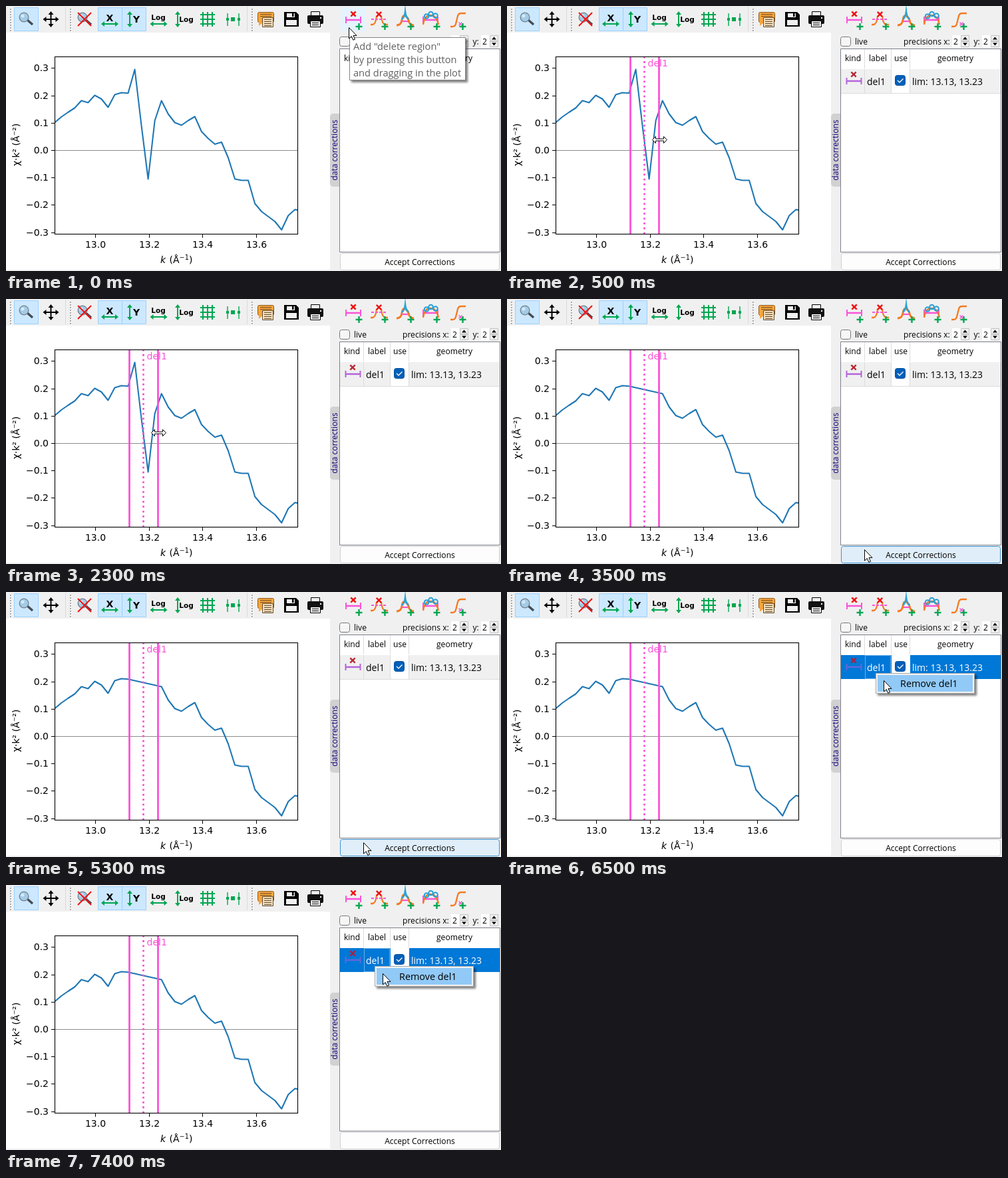
Recreate the animation shown at these times as an HTML page with a canvas. Size 744 px wide and 399 px high, loop 8000 ms.

```html
<!DOCTYPE html>
<html lang="en">
<head>
<meta charset="utf-8">
<title>Data corrections</title>
<style>
html, body { margin: 0; width: 100%; height: 100%; overflow: hidden; background: #f0f0f0; }
canvas { display: block; }
</style>
</head>
<body>
<canvas id="stage" width="744" height="399"></canvas>
<script>
const c = document.getElementById('stage').getContext('2d');
const LOOP = 8000, DRAWN = 500, APPLIED = 3500, MENU = 6500;
const GREEN = '#00a650', PINK = '#fb53d8', ORANGE = '#f47a20', RED = '#f01010', BLUE = '#1f77b4';
const UI = '"Open Sans", sans-serif', PLOT = '"DejaVu Sans", sans-serif';
const small = '12.1px ' + UI, row = '14px ' + UI, plotFont = '14px ' + PLOT;

// Curve heights in pixels, sampled at a constant step in k
const curveY = [175, 166.5, 159.5, 153, 142, 145, 134, 139.5, 152, 133, 130, 130.7, 95, 180,
  260, 172, 142, 162, 175, 179, 172, 166, 188.5, 199, 207.5, 204.5, 228, 260, 262, 262,
  297, 309, 316.5, 324, 336.5, 315, 306, 308];

function text(s, x, y, font = small, color = '#000', align = 'left') {
  c.font = font;
  c.fillStyle = color;
  c.textAlign = align;
  c.fillText(s, x, y);
  return x + c.measureText(s).width;
}

function rect(x, y, w, h, color) {
  c.fillStyle = color;
  c.fillRect(x, y, w, h);
}

function box(x, y, w, h, fill, border, r = 0) {
  c.beginPath();
  c.roundRect(x + .5, y + .5, w - 1, h - 1, r);
  c.fillStyle = fill;
  c.fill();
  c.strokeStyle = border;
  c.lineWidth = 1;
  c.stroke();
}

function line(points, color, width = 1, dash = []) {
  c.beginPath();
  for (let i = 0; i < points.length; i += 2) c.lineTo(points[i], points[i + 1]);
  c.strokeStyle = color;
  c.lineWidth = width;
  c.setLineDash(dash);
  c.stroke();
  c.setLineDash([]);
}

function poly(points, color) {
  c.beginPath();
  for (let i = 0; i < points.length; i += 2) c.lineTo(points[i], points[i + 1]);
  c.fillStyle = color;
  c.fill();
}

function disc(x, y, r, color) {
  c.beginPath();
  c.arc(x, y, r, 0, 7);
  c.fillStyle = color;
  c.fill();
}

function path(d, color, width) {
  c.strokeStyle = color;
  c.lineWidth = width;
  c.stroke(new Path2D(d));
}

function cross(x, y, r, color, width) {
  line([x - r, y - r, x + r, y + r], color, width);
  line([x - r, y + r, x + r, y - r], color, width);
}

function plus(x, y) {
  line([x - 5, y, x + 5, y], GREEN, 2.4);
  line([x, y - 5, x, y + 5], GREEN, 2.4);
}

function span(x, y, color, dash) {
  line([x - 11, y, x + 11, y], color, 2.5, dash);
  for (const end of [x - 11, x + 11]) line([end, y - 5, end, y + 5], color, 2);
}

function doubleArrow(x, y, half, color, vertical, width = 2, head = 4) {
  c.save();
  c.translate(x, y);
  if (vertical) c.rotate(Math.PI / 2);
  line([-half + 2, 0, half - 2, 0], color, width);
  for (const s of [-1, 1]) poly([s * half, 0, s * (half - 5), -head, s * (half - 5), head], color);
  c.restore();
}

function grip(x) {
  for (let y = 4; y < 37; y += 4) {
    rect(x + 1, y + 1, 2, 2, '#fff');
    rect(x, y, 2, 2, '#aaa');
  }
}

function magnifier(x, y) {
  line([x + 5, y + 4, x + 13, y + 11], '#454b55', 3.4);
  disc(x, y, 7.5, '#74818d');
  disc(x, y, 6.2, '#a3cbe6');
  disc(x - 2, y - 2, 2.5, '#d3eaf7');
}

function drawToolbar() {
  rect(0, 0, 744, 399, '#f0f0f0');
  rect(0, 40, 487, 357, '#fff');
  for (const x of [6, 96, 369]) grip(x);
  for (const x of [89, 362]) line([x + .5, 1, x + .5, 38], '#dadada');
  for (const x of [12, 138, 174]) box(x, 2, 37, 36, '#cce8ff', '#99d1ff');

  magnifier(27, 17);
  doubleArrow(67.5, 20, 12, '#000', false, 2, 4);
  doubleArrow(67.5, 20, 12, '#000', true, 2, 4);
  magnifier(115, 17);
  cross(118, 20, 10, RED, 2);

  const bold = 'bold 14px ' + PLOT, log = 'bold 10.5px ' + PLOT;
  text('X', 156, 23, bold, '#000', 'center');
  doubleArrow(156, 27, 13, GREEN);
  doubleArrow(186, 20, 12, GREEN, true);
  text('Y', 196, 25, bold, '#000', 'center');
  text('Log', 229, 21, log, '#000', 'center');
  doubleArrow(229.5, 27, 13, GREEN);
  doubleArrow(258, 20, 12, GREEN, true);
  text('Log', 271, 24, log, '#000', 'center');
  for (const d of [-7, 0, 7]) {
    line([292, 20 + d, 314, 20 + d], GREEN, 2);
    line([303 + d, 9, 303 + d, 31], GREEN, 2);
  }
  for (const x of [333, 350]) {
    line([x, 11, x, 30], GREEN, 1.4);
    rect(x - 2, 18, 4, 4, GREEN);
  }
  rect(338, 17, 6, 6, GREEN);

  box(378, 9, 25, 16, '#f8a53c', '#8a5a1c', 2);
  poly([380, 24, 380, 30, 387, 24], '#f8a53c');
  for (const y of [12, 15]) line([382, y + .5, 399, y + .5], '#6b4a20', 1);
  box(385, 17, 17, 15, '#f5dfbb', '#5d4930');
  for (const y of [20, 23, 26, 29]) line([388, y + .5, 399, y + .5], '#5d4930', 1);

  poly([418, 9, 436, 9, 440, 13, 440, 31, 418, 31], '#000');
  rect(422, 11, 12, 6, '#f0f0f0');
  rect(430, 11, 2.5, 5, '#000');
  rect(421, 21, 16, 8, '#f0f0f0');

  box(458, 8, 14, 9, '#f0f0f0', '#000');
  c.beginPath();
  c.roundRect(453, 14, 24, 13, 2);
  c.fillStyle = '#111';
  c.fill();
  rect(472, 17, 2, 2, '#fff');
  box(457, 22, 16, 10, '#f0f0f0', '#000');
  line([460, 25.5, 470, 25.5], '#000');
  line([460, 28.5, 470, 28.5], '#000');
}

function drawPlot(t) {
  for (let i = 0; i < 4; i++) {
    const x = Math.round(134 + i * 80.7) + .5;
    line([x, 344, x, 349], '#000');
    text((13 + i * .2).toFixed(1), x, 364, plotFont, '#000', 'center');
  }
  for (let i = -3; i <= 3; i++) {
    const y = Math.round(216.9 - i * 41.2) + .5;
    line([68, y, 73, y], '#000');
    text((i / 10).toFixed(1).replace('-', '\u2212'), 64, y + 4.5, plotFont, '#000', 'right');
  }
  let x = text('k', 232, 387, 'italic ' + plotFont) + 1;
  x = text(' (Å', x, 387, plotFont);
  x = text('\u22121', x, 382, '9.7px ' + PLOT);
  text(')', x, 387, plotFont);
  c.save();
  c.translate(20, 209);
  c.rotate(-Math.PI / 2);
  text('χ·k² (Å⁻²)', 0, 0, plotFont, '#000', 'center');
  c.restore();

  c.save();
  c.beginPath();
  c.rect(73, 76, 366, 268);
  c.clip();
  line([73, 217.5, 439, 217.5], '#8c8c8c', 1.1);
  const curve = curveY.flatMap((y, i) =>
    t >= APPLIED && i > 11 && i < 16 ? [] : [73.2 + i * 10.03, y + .5]);
  c.lineJoin = 'round';
  line(curve, BLUE, 2.1);
  c.lineJoin = 'miter';
  if (t >= DRAWN) {
    line([185.5, 76, 185.5, 344], PINK, 2.8);
    line([228.5, 76, 228.5, 344], PINK, 2.8);
    line([206.5, 343.5, 206.5, 76.5], PINK, 2.78, [2.78, 4.58]);
    text('del1', 211.5, 91, plotFont, PINK);
  }
  c.restore();
  c.strokeStyle = '#000';
  c.lineWidth = 1.1;
  c.strokeRect(73.5, 76.5, 365, 267);
}

function spinner(x) {
  rect(x, 44, 25, 18, '#fff');
  text('2', x + 2, 58);
  box(x + 13, 44, 13, 9, '#f0f0f0', '#c4c4c4');
  box(x + 13, 53, 13, 9, '#f0f0f0', '#c4c4c4');
  poly([x + 16, 50.5, x + 19.5, 46.5, x + 23, 50.5], '#000');
  poly([x + 16, 55.5, x + 19.5, 59.5, x + 23, 55.5], '#000');
}

function drawCorrectionButtons(t) {
  if (t < DRAWN) box(503, 2, 38, 36, '#e5f3ff', '#e5f3ff');
  span(522, 21, PINK);
  cross(522, 12, 3.7, RED, 2.5);

  path('M548 28H551Q556 27 557 15M564 15Q565 27 570 28H574', ORANGE, 2.3);
  line([549, 20, 573, 20], PINK, 2.2, [4, 2]);
  cross(560.5, 12.5, 3.7, RED, 2.5);

  line([593, 23, 607, 23], PINK, 2.2);
  path('M587 29Q594 29 595 21T600 15T605 21Q606 29 613 29', ORANGE, 2.8);
  path('M595 20Q599 17 600 8Q601 17 605 20', '#2ba3d4', 2.4);

  span(638, 21, PINK);
  path('M627 28Q629 14 638 14T650 28', ORANGE, 2.3);
  for (const [x, y] of [[632, 15.5], [638.5, 12], [645.5, 14.5]]) {
    c.beginPath();
    c.arc(x, y, 3.3, 0, 7);
    c.strokeStyle = '#259fd8';
    c.lineWidth = 2;
    c.stroke();
  }

  path('M668 31H671Q675 31 676 27L679 15Q680 11 684 11H691', ORANGE, 2.3);
  cross(683, 27, 2.5, PINK, 1.5);
  for (let i = 0; i < 5; i++) plus(530.5 + i * 39, 31);
}

function drawRow(selected) {
  rect(502, 95, 240, 36, selected ? '#0078d7' : '#f0f0f0');
  rect(578, 95, 28, 36, '#fff');
  if (!selected) {
    for (const x of [537, 577, 605]) line([x + .5, 95, x + .5, 131], '#dcdcdc');
    line([502, 131.5, 742, 131.5], '#dcdcdc');
  } else {
    c.strokeStyle = '#d5e8f8';
    c.lineWidth = 1;
    c.setLineDash([1, 1]);
    c.strokeRect(538.5, 95.5, 38, 35);
    c.setLineDash([]);
  }
  span(521.5, 113, selected ? '#6467d8' : '#b565d9');
  cross(521, 103, 3.7, selected ? '#a72243' : '#b92a37', 2.4);
  const ink = selected ? '#fff' : '#000';
  text('del1', 541, 119, row, ink);
  text('lim: 13.13, 13.23', 609, 119, row, ink);
  box(583, 104, 16, 16, '#005fb8', '#00509c', 3);
  line([587, 112, 590, 115, 595.5, 109.5], '#fff', 1.3);
}

function drawPanel(t) {
  drawCorrectionButtons(t);
  box(501, 46, 16, 15, '#f6f6f6', '#777', 3);
  text('live', 523, 58);
  text('precisions x:', 596, 58);
  spinner(669);
  text('y:', 701.5, 58);
  spinner(714);

  box(501, 64, 242, 307, '#fff', '#7d828a');
  for (const x of [537, 577, 605]) line([x + .5, 65, x + .5, 94], '#dcdcdc');
  for (const [label, x] of [['kind', 520], ['label', 557.5], ['use', 592], ['geometry', 674]])
    text(label, x, 83, small, '#000', 'center');
  if (t >= DRAWN) drawRow(t >= MENU);

  const hover = t >= APPLIED && t < MENU;
  box(502, 372, 240, 26, hover ? '#e0eef9' : '#fdfdfd', hover ? '#3b91d0' : '#d0d0d0', 3);
  text('Accept Corrections', 622, 390, small, '#000', 'center');

  c.beginPath();
  c.roundRect(487, 162, 14, 110, [5, 0, 0, 5]);
  c.fillStyle = '#d1d1d1';
  c.fill();
  c.save();
  c.translate(498, 217);
  c.rotate(-Math.PI / 2);
  text('data corrections', 0, 0, small, '#160080', 'center');
  c.restore();
}

function popup(x, y, w, h, fill, border) {
  c.save();
  c.shadowColor = 'rgba(0,0,0,.5)';
  c.shadowBlur = 3;
  c.shadowOffsetX = c.shadowOffsetY = 3;
  rect(x, y, w, h, fill);
  c.restore();
  box(x, y, w, h, fill, border);
}

function drawTooltip() {
  popup(516, 47, 175, 65, '#fff', '#858585');
  ['Add "delete region"', 'by pressing this button', 'and dragging in the plot']
    .forEach((s, i) => text(s, 522, 66 + i * 20, '14.6px ' + UI, '#606060'));
}

function drawMenu() {
  popup(554, 122, 149, 31, '#f2f2f2', '#a8a8a8');
  rect(557, 125, 143, 25, '#91c9f7');
  text('Remove del1', 591, 143, '14.4px ' + UI);
}

function outlined(d, x, y) {
  c.save();
  c.translate(x, y);
  const shape = new Path2D(d);
  c.fillStyle = '#fff';
  c.fill(shape);
  c.strokeStyle = '#000';
  c.lineWidth = 1;
  c.stroke(shape);
  c.restore();
}

function drawCursor(t) {
  if (t >= DRAWN && t < APPLIED) {
    outlined('M-11 0L-6 -5V-1.5H6V-5L11 0L6 5V1.5H-6V5Z', 229.5, 201.5);
    return;
  }
  const [x, y] = t < DRAWN ? [515, 32] : t < MENU ? [537, 377] : [566, 133];
  outlined('M0 0V16.5L3.8 13L6.3 18.8L9 17.6L6.5 12H11.5Z', x + .5, y + .5);
}

function frame() {
  const t = performance.now() % LOOP;
  drawToolbar();
  drawPlot(t);
  drawPanel(t);
  if (t < DRAWN) drawTooltip();
  if (t >= MENU) drawMenu();
  drawCursor(t);
  requestAnimationFrame(frame);
}
frame();
</script>
</body>
</html>
```
